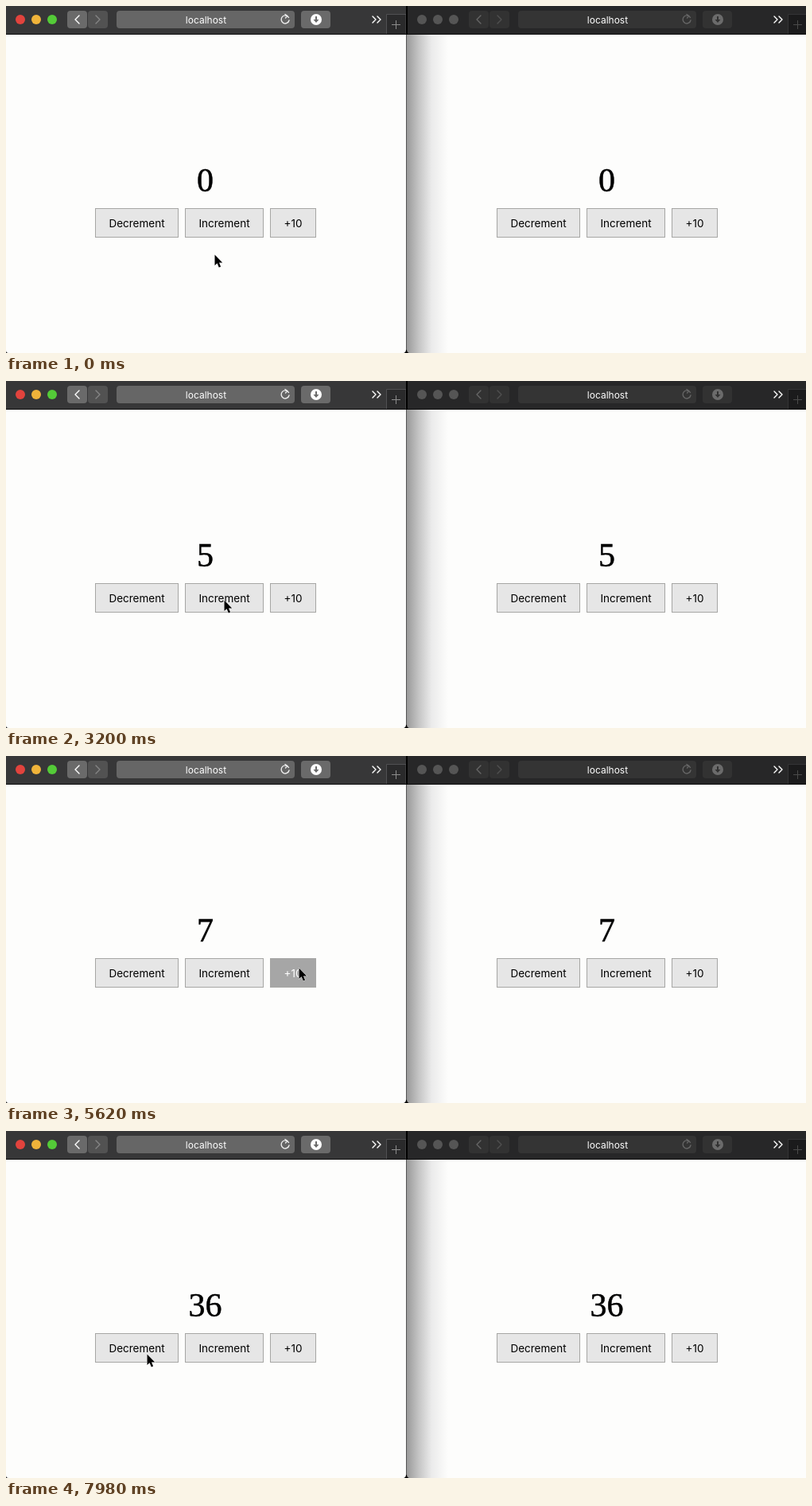
Animation, 1006 px wide and 436 px high, one loop 8000 ms. Source, as an HTML page:

```html
<!DOCTYPE html>
<html lang="en">
<head>
<meta charset="utf-8">
<title>Synchronised counters</title>
<style>
  html, body { margin: 0; width: 100%; height: 100%; overflow: hidden; background: #fdfdfc; }
  svg { display: block; }
  text { font-family: Inter, sans-serif; text-anchor: middle; }
  .count { font: 42px "Liberation Serif", serif; stroke: #000; stroke-width: .5; }
  .label { font-size: 13.5px; }
  .address { font-size: 12px; fill: #fff; }
  .button rect { fill: #e6e6e6; stroke: #a6a6a4; }
  .button.pressed rect { fill: #a6a6a6; }
  .button.pressed text { fill: #fff; }
  .line { fill: none; stroke-width: 1.4; stroke-linecap: round; stroke-linejoin: round; }
</style>
</head>
<body>
<svg id="stage" width="1006" height="436" viewBox="0 0 1006 436"></svg>
<script>
const DURATION = 8000;
const stage = document.getElementById('stage');

const themes = [
  { bar: '#373738', lights: ['#e2433d', '#f0b33a', '#54cb38'], back: '#6a6a6a', next: '#525252',
    field: '#666', icon: '#fff', dim: '#858585', reload: '#eee', badge: '#fff', tab: '#2a2a2b', edge: '#505052', plus: '#8c8c8c' },
  { bar: '#272728', lights: ['#555', '#555', '#555'], back: '#323232', next: '#323232',
    field: '#343434', icon: '#666', dim: '#505050', reload: '#666', badge: '#6b6b6b', tab: '#1b1b1c', edge: '#343436', plus: '#4a4a4a' }
];

const box = (x, w, fill) => `<rect x="${x}" y="6" width="${w}" height="22" rx="4" fill="${fill}"/>`;
const line = (d, color) => `<path class="line" d="${d}" stroke="${color}"/>`;

function button(name, x, width) {
  return `<g class="button" data-name="${name}">
    <rect x="${x + .5}" y="254.5" width="${width - 1}" height="36"/>
    <text class="label" x="${x + width / 2}" y="278">${name}</text></g>`;
}

function browser(c, x) {
  const lights = c.lights.map((fill, i) => `<circle cx="${18 + 20 * i}" cy="17" r="6" fill="${fill}"/>`).join('');
  return `<g transform="translate(${x})">
    <rect width="503" height="35" fill="${c.bar}"/>
    <rect y="35" width="503" height="1" fill="#0c0c0c"/>
    ${lights}
    ${box(77, 25, c.back)}${box(103, 25, c.next)}${box(139, 224, c.field)}${box(371, 37, c.back)}
    ${line('M92 12l-5 5 5 5', c.icon)}${line('M113 12l5 5-5 5', c.dim)}
    <text class="address" x="251.5" y="21.5">localhost</text>
    ${line('M355.5 14.5A5 5 0 1 0 356 18M351 10.5l3 2-2.5 2.5', c.reload)}
    <circle cx="390" cy="17" r="7" fill="${c.badge}"/>
    <path d="M389 13h2v4h2.5l-3.5 4-3.5-4h2.5z" fill="${c.back}"/>
    ${line('M461 13l4 4-4 4M467 13l4 4-4 4', '#fff')}
    <path d="M478.5 35V10.5H503V35" fill="${c.tab}" stroke="${c.edge}"/>
    <path d="M485 23.5h11M490.5 18v11" stroke="${c.plus}"/>
    <text class="count" x="250.5" y="233">0</text>
    ${button('Decrement', 112, 105)}${button('Increment', 225, 99)}${button('+10', 332, 58)}
  </g>`;
}

stage.innerHTML = `
  <defs><linearGradient id="shadow">
    <stop offset="0" stop-color="#9a9a9a"/>
    <stop offset=".3" stop-color="#c6c6c6"/>
    <stop offset=".6" stop-color="#ebebeb"/>
    <stop offset="1" stop-color="#fdfdfc"/>
  </linearGradient></defs>
  <rect width="1006" height="436" fill="#fdfdfc"/>
  <rect x="504" y="36" width="52" height="400" fill="url(#shadow)"/>
  ${themes.map((theme, i) => browser(theme, 505 * i)).join('')}
  <path d="M503 0h2v36h-2z"/>
  <path d="M503 36h1v400h-1z" fill="#555"/>
  <path d="M500 436q3-1 3-4h1q0 3 3 4zM0 433v3h3q-3 0-3-3z"/>
  <path id="arrow" d="M0 0V13.6L3.1 10.8 5.3 15.9 7.6 14.9 5.5 9.9H9.7Z" stroke="#fff" stroke-linejoin="round" paint-order="stroke"/>
  <path id="beam" d="M-3.5-7.5Q0-7.5 0-5.5Q0-7.5 3.5-7.5M0-5.5V5.5M-3.5 7.5Q0 7.5 0 5.5Q0 7.5 3.5 7.5" fill="none" stroke="#000" stroke-width="1.2"/>`;

// Pointer stops: time, x, y
const path = [
  [20, 262.5, 312.5], [540, 262, 270], [700, 262, 270], [950, 248, 264], [1250, 300, 265],
  [1420, 284, 270], [1520, 284, 270], [1800, 274.5, 275.5], [3800, 274.5, 275.5],
  [3940, 320, 268], [4040, 320, 268], [4220, 329.5, 266], [4960, 329.5, 266],
  [5240, 368.5, 266.5], [6640, 368.5, 266.5], [7020, 236, 274], [7120, 236, 274], [7500, 177.5, 280.5]
];

// Clicks: press, release, button, resulting count
const clicks = [
  [2000, 2100, 'Increment', 1], [2240, 2380, 'Increment', 2], [2540, 2640, 'Increment', 3],
  [2820, 2920, 'Increment', 4], [3100, 3200, 'Increment', 5], [3380, 3480, 'Increment', 6],
  [3640, 3740, 'Increment', 7], [5540, 5720, '+10', 17], [5980, 6140, '+10', 27],
  [6400, 6560, '+10', 37], [7860, 7960, 'Decrement', 36]
];

function pointerAt(t) {
  const next = path.findIndex(stop => stop[0] > t);
  if (next < 0) return path.at(-1).slice(1);
  if (next === 0) return path[0].slice(1);
  const [t0, x0, y0] = path[next - 1], [t1, x1, y1] = path[next];
  const p = (t - t0) / (t1 - t0), eased = p * p * (3 - 2 * p);
  return [x0 + (x1 - x0) * eased, y0 + (y1 - y0) * eased];
}

const counts = stage.querySelectorAll('.count');
const buttons = stage.querySelectorAll('.button');
const arrow = document.getElementById('arrow');
const beam = document.getElementById('beam');

function draw(now) {
  const t = now % DURATION;
  const [x, y] = pointerAt(t);
  const count = clicks.findLast(click => click[1] <= t)?.[3] ?? 0;
  const active = clicks.find(([down, up]) => t >= down && t < up)?.[2];
  const inGap = y > 254 && y < 291 && ((x > 217 && x < 225) || (x > 324 && x < 332));

  counts.forEach(node => node.textContent = count);
  buttons.forEach((node, i) => node.classList.toggle('pressed', i < 3 && node.dataset.name === active));
  for (const [node, shown] of [[arrow, !inGap], [beam, inGap]]) {
    node.setAttribute('transform', `translate(${x} ${y})`);
    node.style.display = shown ? '' : 'none';
  }
}

function tick() {
  draw(performance.now());
  requestAnimationFrame(tick);
}
tick();
</script>
</body>
</html>
```
